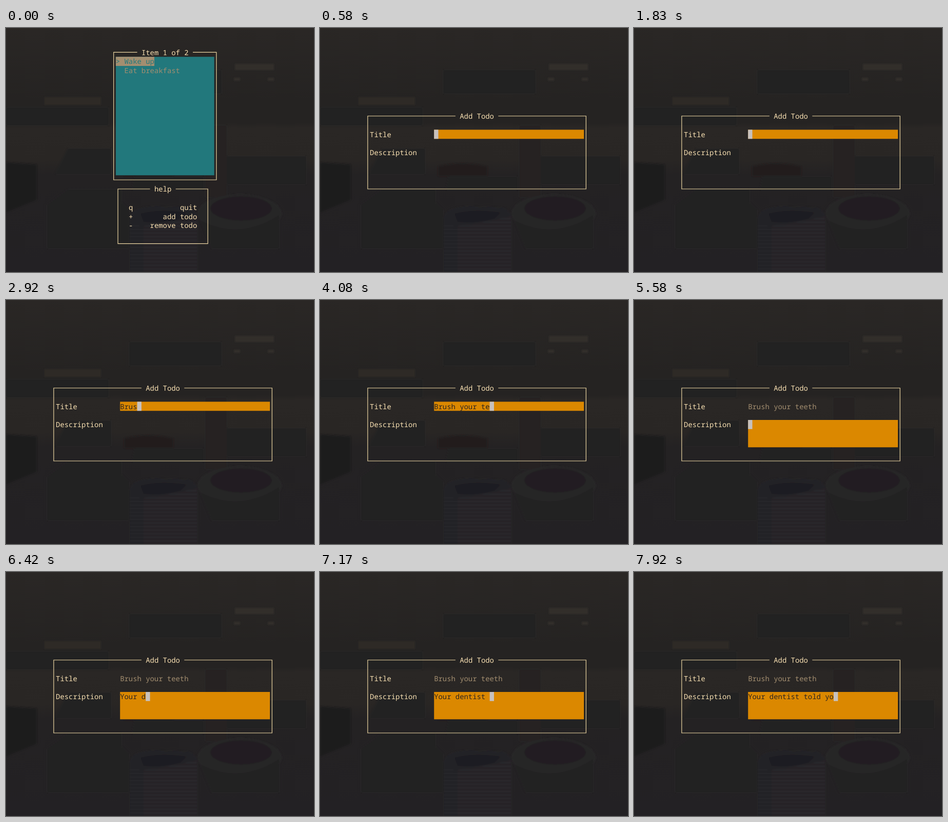
Animation of 600x476 px, one loop 8000 ms. Source, as an HTML page:

```html
<!DOCTYPE html>
<html lang="en">
<head>
<meta charset="utf-8">
<title>Todo form</title>
<style>
  html, body { margin: 0; width: 100%; height: 100%; overflow: hidden; background: #252322; }
  svg { display: block; width: 100%; height: 100%; }
  text { font: 13.9px "Noto Sans Mono", "DejaVu Sans Mono", monospace; white-space: pre; text-rendering: geometricPrecision; fill: #f8e0b2; }
  .frame { fill: none; stroke: #eed7a3; stroke-width: 1.2; }
  .dim { fill: #a38e70; }
  .teal { fill: #22787c; }
  .ink { fill: #2b2421; }
  .field { fill: #db8800; }
  .cursor { fill: #c7c1be; }
</style>
</head>
<body>
<svg id="stage" viewBox="0 0 600 476">
  <defs>
    <linearGradient id="dusk" x2="0" y2="1">
      <stop offset="0" stop-color="#2a2725"/>
      <stop offset=".3" stop-color="#252322"/>
      <stop offset=".39" stop-color="#252322"/>
      <stop offset=".41" stop-color="#2a2725"/>
      <stop offset=".54" stop-color="#292624"/>
      <stop offset=".6" stop-color="#242223"/>
      <stop offset="1" stop-color="#232124"/>
    </linearGradient>
    <pattern id="floors" width="10" height="7" patternUnits="userSpaceOnUse">
      <rect width="10" height="7" fill="#252428"/>
      <rect width="10" height="2" fill="#2a292e"/>
    </pattern>
    <filter id="soft"><feGaussianBlur stdDeviation="1.5"/></filter>
  </defs>

  <rect width="600" height="476" fill="url(#dusk)"/>
  <g filter="url(#soft)">
    <path d="M0 262L60 266V335L0 360Z" fill="#1f1d1f"/>
    <path d="M80 345L120 315H225V340L240 355V430H80Z" fill="#222022"/>
    <path d="M120 235H205V285H95Z" fill="#242221"/>
    <path d="M230 270Q275 258 326 270V289H230Z" fill="#201e1e"/>
    <path d="M250 290H385V316H245Z" fill="#222021"/>
    <path d="M430 250H585V305H430Z" fill="#232122"/>
    <path d="M388 190H430V330H388Z" fill="#262423"/>
    <path d="M75 135H185V150H75Z" fill="#2d2a28"/>
    <path d="M446 70H522V82H446ZM444 97H456V103H444ZM510 97H522V103H510Z" fill="#302d2b"/>
    <path d="M0 155H200V190H0Z" fill="#232120"/>
    <path d="M240 82H420V128H240Z" fill="#242221"/>
    <ellipse cx="455" cy="362" rx="82" ry="38" fill="#272527"/>
    <ellipse cx="458" cy="352" rx="60" ry="24" fill="#211f21"/>
    <path d="M378 375Q455 415 532 365V430H400Z" fill="#222022"/>
    <path d="M241 372Q243 350 285 348L355 350Q373 356 373 375V476H241Z" fill="#232226"/>
    <path d="M268 386Q325 380 372 366V476H268Z" fill="url(#floors)"/>
    <path d="M241 380L268 388V476H241Z" fill="url(#floors)" opacity=".7"/>
    <path d="M262 362Q300 352 352 360L340 372Q300 382 268 378Z" fill="#1f1d21"/>
  </g>
</svg>
<script>
const COL = 8.34, ROW = 17.78, LEFT = 97.1, TOP = 56.2, LOOP = 8000;
const OPEN_AT = 330, TAB_AT = 5170;
const TITLE = "Brush your teeth", NOTE = "Your dentist told you";
const titleKeys = [2580, 2670, 2750, 2920, 3000, 3170, 3330, 3420,
                   3580, 3670, 3830, 3920, 4080, 4250, 4420, 4580];
const noteKeys = [...NOTE].map((_, i) => 5830 + i * 109.5);

const stage = document.getElementById("stage");
const colX = c => LEFT + c * COL;
const rowY = r => TOP + r * ROW;

function add(parent, tag, attrs = {}) {
  const el = document.createElementNS("http://www.w3.org/2000/svg", tag);
  for (const k in attrs) el.setAttribute(k, attrs[k]);
  return parent.appendChild(el);
}
function label(parent, c, r, str, cls = "") {
  const el = add(parent, "text", { x: colX(c), y: rowY(r) + 14.2, class: cls });
  el.textContent = str;
  return el;
}
function block(parent, c, r, w, h, cls) {
  return add(parent, "rect", { x: colX(c), y: rowY(r), width: w * COL, height: h * ROW, class: cls });
}
// Border lines run through cell centres, broken around the title.
function panel(parent, c0, r0, c1, r1, title, at) {
  const [x0, x1] = [c0, c1].map(c => colX(c + .5));
  const [y0, y1] = [r0, r1].map(r => rowY(r + .5));
  const a = colX(at - 1), b = colX(at + title.length + 1);
  add(parent, "path", { class: "frame", d: `M${a} ${y0}H${x0}V${y1}H${x1}V${y0}H${b}` });
  label(parent, at, r0, title);
}

const list = add(stage, "g");
panel(list, 13, -1, 37, 13, "Item 1 of 2", 20);
block(list, 14, 0, 23, 13, "teal");
block(list, 14, 0, 9, 1, "dim");
label(list, 14, 0, "> Wake up", "teal");
label(list, 16, 1, "Eat breakfast", "dim");
panel(list, 14, 14, 35, 20, "help", 23);
[["q", "quit"], ["+", "add todo"], ["-", "remove todo"]].forEach(([key, what], i) => {
  label(list, 17, 16 + i, key);
  label(list, 33 - what.length, 16 + i, what);
});

const form = add(stage, "g");
panel(form, -1, 6, 50, 14, "Add Todo", 21);
label(form, 0, 8, "Title");
label(form, 0, 10, "Description");
const titleField = block(form, 15, 8, 35, 1, "field");
const noteField = block(form, 15, 10, 35, 3, "field");
const titleText = label(form, 15, 8, "");
const noteText = label(form, 15, 10, "", "ink");
const cursor = block(form, 15, 8, 1, 1, "cursor");

const show = (el, on) => el.setAttribute("visibility", on ? "visible" : "hidden");
const typed = (keys, t) => keys.filter(k => k <= t).length;

function draw(t) {
  const open = t >= OPEN_AT, inNote = t >= TAB_AT;
  list.style.display = open ? "none" : "";
  form.style.display = open ? "" : "none";
  const n = typed(titleKeys, t), m = typed(noteKeys, t);
  titleText.textContent = TITLE.slice(0, n);
  titleText.setAttribute("class", inNote ? "dim" : "ink");
  noteText.textContent = NOTE.slice(0, m);
  show(titleField, !inNote);
  show(noteField, inNote);
  cursor.setAttribute("x", colX(15 + (inNote ? m : n)));
  cursor.setAttribute("y", rowY(inNote ? 10 : 8));
}

const start = performance.now();
function tick(now) {
  draw(Math.max(0, now - start) % LOOP);
  requestAnimationFrame(tick);
}
draw(0);
requestAnimationFrame(tick);
</script>
</body>
</html>
```
